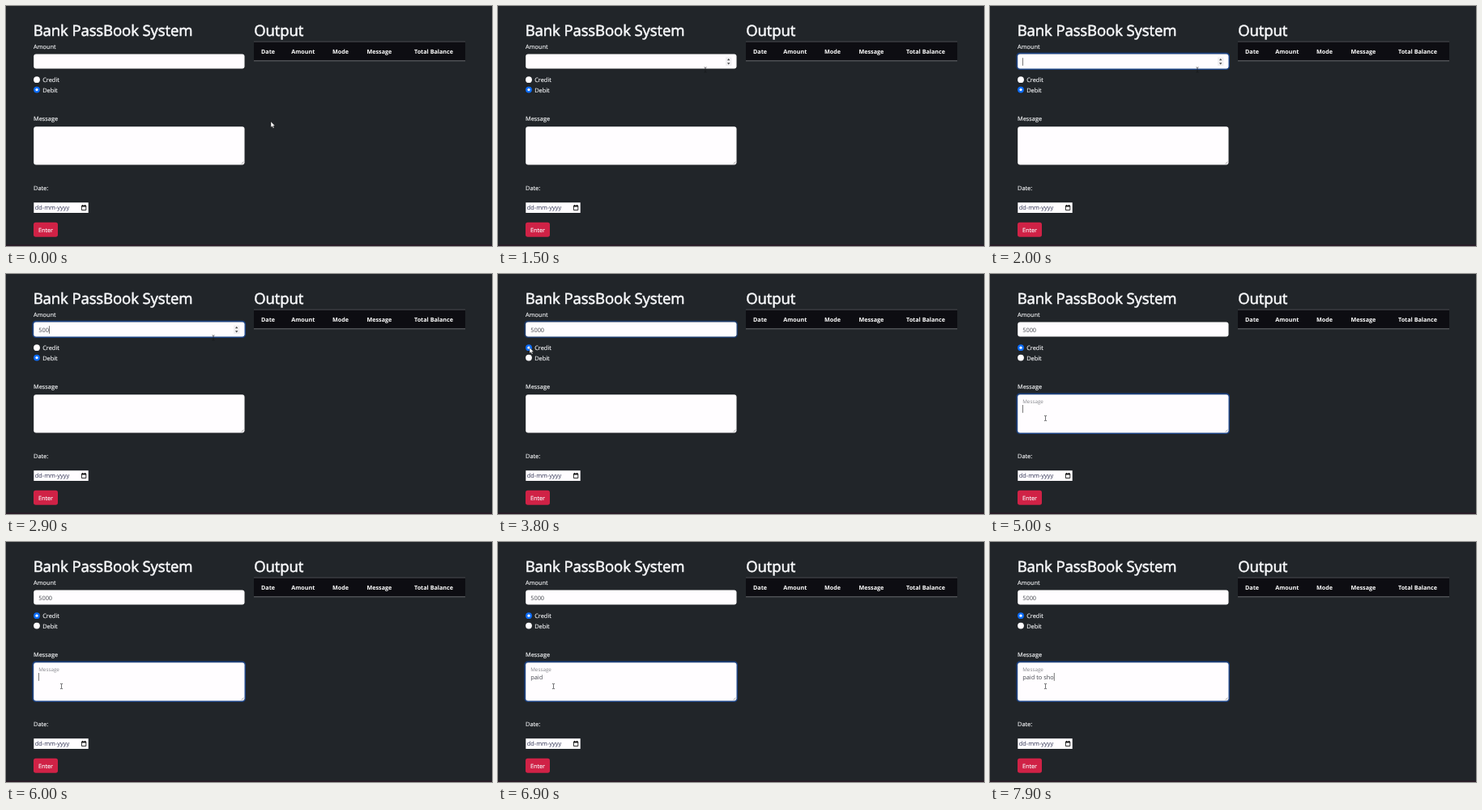
These frames come from a looping animation (600 px wide and 297 px high, 8000 ms). An HTML page:

```html
<!DOCTYPE html>
<html lang="en">
<head>
<meta charset="utf-8">
<title>Passbook form</title>
<style>
  html, body { margin: 0; width: 100%; height: 100%; overflow: hidden; background: #212529; }
  svg { display: block; }
  text { font: 7.4px "Open Sans", "Noto Sans", sans-serif; fill: #f8f9fb; stroke: #f8f9fb; stroke-width: .14; white-space: pre; text-rendering: geometricPrecision; }
  .title { font-size: 18.6px; letter-spacing: -.14px; stroke-width: .55; }
  .head text { font-size: 7.2px; font-weight: 700; fill: #fff; stroke: none; }
  .typed { fill: #43464d; stroke: none; }
  .date { fill: #2c3050; stroke: none; }
  .field { fill: #fffdff; }
  .ring { fill: none; stroke: #1c4384; stroke-width: 2; }
  .line { fill: none; stroke: #666; stroke-width: .5; }
</style>
</head>
<body>
<svg width="600" height="297" viewBox="0 0 600 297">
  <rect y="295.5" width="600" height="1.5" fill="#2b1b27"/>
  <text class="title" x="33.7" y="36.5">Bank PassBook System</text>
  <text class="title" x="306.2" y="36.5">Output</text>

  <g class="head">
    <rect x="306" y="44" width="261" height="24" fill="#0d0d12"/>
    <path d="M306 44.2H567" stroke="#6d6f73" stroke-width=".6"/>
    <path d="M306 67.8H567" stroke="#a6a8ab" stroke-width=".6"/>
    <text x="315" y="59.2">Date</text>
    <text x="352.3" y="59.2">Amount</text>
    <text x="403" y="59.2">Mode</text>
    <text x="445.5" y="59.2">Message</text>
    <text x="504" y="59.2">Total Balance</text>
  </g>

  <text x="34" y="52.7">Amount</text>
  <rect class="ring" id="amountRing" x="33.5" y="58.7" width="261.5" height="19.3" rx="3.5"/>
  <rect class="field" x="34.2" y="59.4" width="260.3" height="18" rx="3"/>
  <text class="typed" id="amount" x="40.2" y="71.7"></text>
  <g id="spinner">
    <rect x="281" y="63.5" width="7.5" height="10.5" fill="#f1f0f3"/>
    <path d="M283 67.3L284.7 65L286.4 67.3ZM283 70.3L284.7 72.6L286.4 70.3Z" fill="#444"/>
  </g>

  <circle cx="38" cy="91.2" r="3.9"/>
  <circle cx="38" cy="103.6" r="3.9"/>
  <circle class="dot" cx="38" cy="91.2" r="1.6" fill="#fff"/>
  <circle class="dot" cx="38" cy="103.6" r="1.6" fill="#fff"/>
  <text x="45.2" y="94.1">Credit</text>
  <text x="45.2" y="106.5">Debit</text>

  <text x="34" y="142.2">Message</text>
  <rect class="ring" id="messageRing" x="33.5" y="148.5" width="261.5" height="48.5" rx="3.5"/>
  <rect class="field" x="34.2" y="149.2" width="260.3" height="47.2" rx="3"/>
  <path class="line" d="M290.5 195.5L293.5 192.5M292.3 195.5L293.5 194.3"/>
  <text id="label" x="40.2" style="fill:#85878c;stroke:none">Message</text>
  <text class="typed" id="message" x="40.2" y="169.5"></text>

  <text x="34" y="228.3">Date:</text>
  <rect x="34.3" y="243.2" width="67.4" height="12.8" fill="#fffdff"/>
  <text class="date" x="35.8" y="252.4">dd-mm-yyyy</text>
  <path class="line" d="M93.4 247.2H98.8V252.6H93.4ZM94.6 246V247M97.6 246V247" style="stroke:#111;stroke-width:.9"/>
  <path d="M93.4 246.8H98.8V248.5H93.4Z" fill="#111"/>
  <rect x="34" y="267.8" width="30" height="18" rx="2.8" fill="#d02246"/>
  <text x="40" y="279.7" style="font-size:7.2px">Enter</text>

  <rect id="caret" width=".6" fill="#222"/>
  <path id="arrow" d="M0 0V7.2L1.7 5.7L2.8 8.2L4 7.7L2.9 5.3H5.1Z" fill="#fff" stroke="#111" stroke-width=".4"/>
  <path id="beam" d="M-1.5 -3.2Q0 -3.2 0 -2.4Q0 -3.2 1.5 -3.2M0 -2.4V2.4M-1.5 3.2Q0 3.2 0 2.4Q0 3.2 1.5 3.2" fill="none" stroke="#15161a" stroke-width=".6"/>
</svg>
<script>
const LOOP = 8000;
const $ = id => document.getElementById(id);
const radios = document.querySelectorAll('circle:not(.dot)');
const dots = document.querySelectorAll('.dot');

const AMOUNT_FOCUS = 1800, CREDIT_CLICK = 3750, MESSAGE_FOCUS = 4265;

// [time, x, y] of the pointer
const pointerPath = [
  [0, 327, 143], [300, 327, 143], [900, 276, 104], [1100, 272, 98], [1400, 256, 79],
  [3350, 256, 79], [3680, 39, 91], [3820, 39, 91], [4150, 68.5, 178.5], [LOOP, 68.5, 178.5]
];
// [time, characters typed so far]; each entry also restarts the caret blink
const amountKeys = [[AMOUNT_FOCUS, 0], [2600, 1], [2800, 2], [2900, 3], [3100, 4]];
const messageKeys = [
  [MESSAGE_FOCUS, 0], [4900, 0], [6200, 1], [6260, 2], [6300, 3], [6390, 4], [7100, 5],
  [7200, 6], [7300, 7], [7400, 8], [7500, 9], [7700, 10], [7900, 11]
];

const ease = p => p * p * (3 - 2 * p);
const ramp = (t, start, length) => ease(Math.min(1, Math.max(0, (t - start) / length)));
const show = (el, on) => el.setAttribute('visibility', on ? 'visible' : 'hidden');

function pointerAt(t) {
  const i = pointerPath.findIndex(k => k[0] > t);
  const [t0, x0, y0] = pointerPath[i - 1], [t1, x1, y1] = pointerPath[i];
  const p = ramp(t, t0, t1 - t0);
  return [x0 + (x1 - x0) * p, y0 + (y1 - y0) * p];
}

function typeInto(el, value, keys, t) {
  const last = keys.filter(k => k[0] <= t).pop() || [0, 0];
  el.textContent = value.slice(0, last[1]);
  return (t - last[0]) % 1000 < 500;
}

function placeCaret(el, top, bottom) {
  const caret = $('caret');
  caret.setAttribute('x', 40.4 + (el.textContent ? el.getComputedTextLength() : 0));
  caret.setAttribute('y', top);
  caret.setAttribute('height', bottom - top);
}

function draw(t) {
  const amountFocused = t >= AMOUNT_FOCUS && t < CREDIT_CLICK;
  const messageFocused = t >= MESSAGE_FOCUS;
  const amountBlink = typeInto($('amount'), '5000', amountKeys, t);
  const messageBlink = typeInto($('message'), 'paid to sho', messageKeys, t);

  $('amountRing').setAttribute('opacity', ramp(t, AMOUNT_FOCUS, 150) - ramp(t, CREDIT_CLICK, 150));
  $('messageRing').setAttribute('opacity', ramp(t, MESSAGE_FOCUS, 150));

  const float = ramp(t, MESSAGE_FOCUS, 120);
  const label = $('label');
  show(label, messageFocused);
  label.style.fontSize = 7.25 - .95 * float + 'px';
  label.setAttribute('y', 164.6 - 4.9 * float);

  show($('caret'), amountFocused && amountBlink || messageFocused && messageBlink);
  if (messageFocused) placeCaret($('message'), 162 + 5 * (1 - float), 171.8);
  else placeCaret($('amount'), 64.2, 73.8);

  const selected = t < CREDIT_CLICK ? 1 : 0;
  radios.forEach((r, i) => r.setAttribute('fill', i === selected ? '#0d6efd' : '#fffdff'));
  dots.forEach((d, i) => show(d, i === selected));

  const [x, y] = pointerAt(t);
  const inside = (top, bottom) => x > 34 && x < 295 && y > top && y < bottom;
  const overAmount = inside(59, 80);
  const overField = overAmount || inside(149, 197);
  show($('spinner'), overAmount || amountFocused);
  show($('arrow'), !overField);
  show($('beam'), overField);
  for (const id of ['arrow', 'beam']) $(id).setAttribute('transform', `translate(${x} ${y})`);
}

const start = performance.now();
function tick() {
  draw((performance.now() - start) % LOOP);
  requestAnimationFrame(tick);
}
tick();
</script>
</body>
</html>
```
